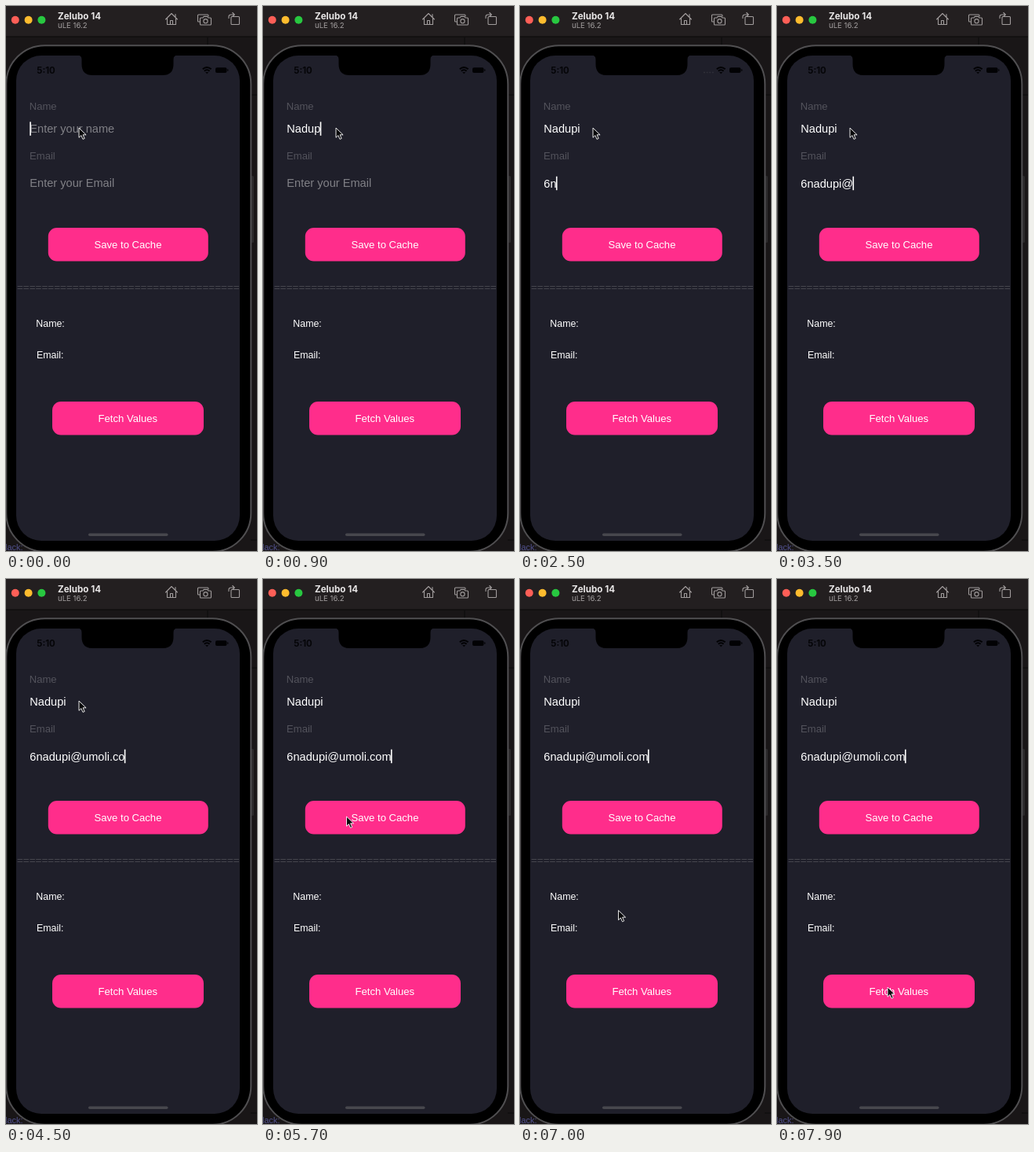
Recreate the animation shown at these times as an HTML page. Size 320 by 693 pixels, loop 8 s.

```html
<!DOCTYPE html>
<html lang="en">
<head>
<meta charset="utf-8">
<title>Cache form demo</title>
<style>
  html, body { margin: 0; width: 100%; height: 100%; overflow: hidden; background: #191617; }
  svg { display: block; width: 100%; height: 100%; }
  text { font-family: "Liberation Sans", Arial, sans-serif; white-space: pre; }
  .ui { font-family: Inter, Roboto, sans-serif; }
  .label { font-size: 13.1px; fill: #53535c; }
  .field { font-size: 14.6px; fill: #fff; }
  .field.empty { fill: #808086; }
  .value { font-size: 12.4px; fill: #fff; }
  .button rect { fill: #ff2d8b; }
  .button text { font-size: 13.1px; fill: #fff; text-anchor: middle; }
  .icon { fill: none; stroke: #a09c9c; stroke-width: 1.1; stroke-linejoin: round; stroke-linecap: round; }
</style>
</head>
<body>
<svg viewBox="0 0 320 693">
  <!-- desktop and window bar -->
  <rect width="320" height="693" fill="#191617"/>
  <path d="M257 40v10M312 113h8M312 679h8" stroke="#0b0a0a"/>
  <text x="-1" y="692" font-size="11" fill="#50508c">lack:</text>
  <rect width="320" height="39" fill="#231f20"/>
  <rect y="38.5" width="320" height="1" fill="#0a0909"/>
  <circle cx="11.8" cy="17.8" r="5" fill="#ff5f57"/>
  <circle cx="28.6" cy="17.8" r="5" fill="#febc2e"/>
  <circle cx="45.4" cy="17.8" r="5" fill="#28c840"/>
  <text class="ui" x="66" y="16.5" font-size="11.6" font-weight="700" fill="#e9e7e7">Zelubo 14</text>
  <text class="ui" x="66" y="27.5" font-size="9.6" fill="#a39f9f">uLE 16.2</text>
  <g class="icon">
    <path d="M203.5 17 211 9.500l7.500 7.500M205.500 15.500v8h11v-8M209.500 23.500v-5h3v5M216 14v-3.500"/>
    <path d="M247 20h-1.500q-1 0-1-1v-7q0-1 1-1h11.500q1 0 1 1v1"/>
    <path d="M248.500 15h2.500l1.200-1.600h4.600L258 15h2.500q1 0 1 1v7q0 1-1 1h-12q-1 0-1-1v-7q0-1 1-1z"/>
    <circle cx="254.500" cy="19.200" r="2.600"/>
    <path d="M288 13.500h8.500q1 0 1 1v8q0 1-1 1H288q-1 0-1-1v-8q0-1 1-1zM284 15.500v-2q0-2.500 3-2.500h4M288.800 8.500 291.300 11l-2.500 2.500"/>
  </g>

  <!-- phone -->
  <rect x="312" y="216" width="4" height="85" rx="1.500" fill="#2b2a2b"/>
  <rect x=".3" y="50.200" width="312" height="643.500" rx="49" fill="#000" stroke="#504f51" stroke-width="2"/>
  <rect x="13" y="63" width="285" height="617" rx="32" fill="#1f1f2a"/>
  <path d="M91 62.500q5.500 0 5.500 5.500v6q0 14 14 14h89q14 0 14-14v-6q0-5.500 5.500-5.500z" fill="#000"/>
  <rect x="105" y="670.500" width="101.500" height="3.500" rx="1.750" fill="#47474d"/>

  <!-- status bar -->
  <text class="ui" x="39.300" y="86" font-size="11.400" font-weight="700" fill="#050508">5:10</text>
  <path id="signal" d="M234 84.500h13" stroke="#30303a" stroke-width="1.500" stroke-dasharray="2 1.600"/>
  <g fill="none" stroke="#020204" stroke-width="2">
    <path d="M250.800 80.300q5.400-4.600 10.800 0M252.800 82.700q3.400-2.800 6.800 0"/>
    <path d="M254.200 84.100h4l-2 2.200z" fill="#020204" stroke="none"/>
  </g>
  <rect x="267" y="78.300" width="14.500" height="6.700" rx="2" fill="#020204"/>
  <rect x="282.200" y="80.300" width="1.200" height="2.500" rx=".6" fill="#020204"/>

  <!-- form -->
  <text class="label" x="29.700" y="131.500">Name</text>
  <text class="field" id="name" x="30.300"></text>
  <text class="label" x="30" y="195">Email</text>
  <text class="field" id="email" x="30.300"></text>
  <g class="button">
    <rect x="53.800" y="282" width="204" height="42.500" rx="11"/>
    <text x="155.500" y="308">Save to Cache</text>
  </g>
  <text id="rule" x="155.800" y="361.900" font-size="13.500" fill="#494950" text-anchor="middle"></text>
  <text class="value" x="38.300" y="408.400">Name:</text>
  <text class="value" x="39" y="447.700">Email:</text>
  <g class="button">
    <rect x="59" y="503" width="193" height="42.500" rx="11"/>
    <text x="155.300" y="529">Fetch Values</text>
  </g>
  <rect id="caret" width="1.600" height="17.500" fill="#fff"/>
  <path id="mouse" d="M0 0v12.300l2.900-2.700 2.100 4.800 2.200-1-2.100-4.600h4z" fill="#08080a" stroke="#fff" stroke-width=".9" stroke-linejoin="round"/>
</svg>
<script>
  const LOOP = 8000;
  const el = id => document.getElementById(id);
  const caret = el('caret'), mouse = el('mouse'), signal = el('signal');
  el('rule').textContent = '='.repeat(36);

  const nameField = {
    node: el('name'), text: 'Nadupi', hint: 'Enter your name',
    keys: [500, 600, 700, 800, 900, 1000],
    textY: 161, hintY: 160.8, caretY: 147.3
  };
  const emailField = {
    node: el('email'), text: '6nadupi@umoli.com', hint: 'Enter your Email',
    keys: [2100, 2500, 2600, 2800, 2900, 3000, 3200, 3500, 3700,
           3800, 3900, 4000, 4100, 4300, 4400, 4500, 4600],
    textY: 230.5, hintY: 229.8, caretY: 216.7
  };
  const FOCUS_EMAIL = 1500;

  // Each stop: time, x, y
  const stops = [[0, 93, 155], [4900, 93, 155], [5600, 106.5, 302],
                 [6600, 106.5, 302], [7350, 141, 519], [LOOP, 141, 519]];

  const ease = p => p * p * (3 - 2 * p);

  function type(field, t) {
    const { node, text, hint } = field;
    const count = field.keys.filter(k => k <= t).length;
    const shown = count ? text.slice(0, count) : hint;
    if (node.textContent !== shown) node.textContent = shown;
    node.setAttribute('y', count ? field.textY : field.hintY);
    node.classList.toggle('empty', !count);
    field.width = count ? node.getComputedTextLength() : 0;
  }

  function moveMouse(t) {
    const i = stops.findIndex((s, n) => n > 0 && t <= s[0]);
    const [t0, x0, y0] = stops[i - 1], [t1, x1, y1] = stops[i];
    const p = ease((t - t0) / (t1 - t0));
    mouse.setAttribute('transform', `translate(${x0 + (x1 - x0) * p} ${y0 + (y1 - y0) * p})`);
  }

  function draw(now) {
    const t = now % LOOP;
    type(nameField, t);
    type(emailField, t);
    const active = t < FOCUS_EMAIL ? nameField : emailField;
    caret.setAttribute('x', 30.3 + active.width - (active.width ? .6 : 0));
    caret.setAttribute('y', active.caretY);
    signal.style.visibility = t >= 2200 && t < 2800 ? 'visible' : 'hidden';
    moveMouse(t);
  }

  let start;
  function tick(now) {
    start ??= now;
    draw(now - start);
    requestAnimationFrame(tick);
  }
  draw(0);
  requestAnimationFrame(tick);
</script>
</body>
</html>
```
